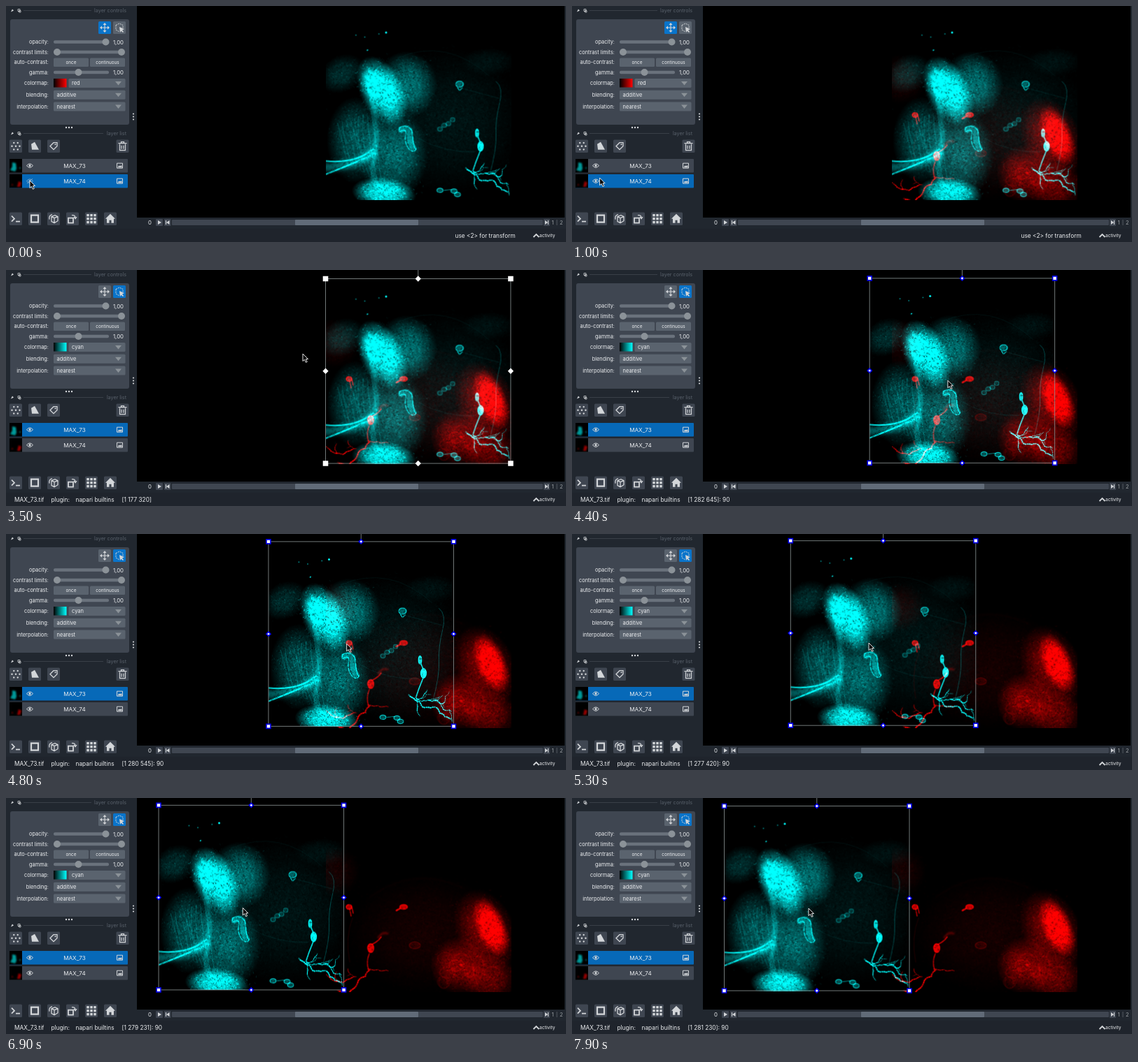
Animation, 800 px wide and 338 px high, one loop 8 s. Source, as an HTML page with a canvas:

```html
<!DOCTYPE html>
<html lang="en">
<head>
<meta charset="utf-8">
<title>Layer transform</title>
<style>
  html, body { margin: 0; width: 100%; height: 100%; overflow: hidden; background: #000; }
  canvas { position: absolute; left: 187px; top: 0; }
  svg { position: absolute; left: 0; top: 0; font-family: Inter, "Open Sans", sans-serif; }
  text { fill: #eceef0; white-space: pre; }
</style>
</head>
<body>
<canvas id="view" width="611" height="303"></canvas>
<svg id="ui" width="800" height="338" viewBox="0 0 800 338"></svg>
<script>
const LOOP = 8000, STEP = 100, LAG = 70;
const BG = '#21272f', PANEL = '#3f4651', FIELD = '#5a636e', GRAY = '#8b9298', BLUE = '#0769b8', ICON = '#d3d6d9';
const TILE = { x: 456.5, y: 12.5, size: 265 };
const $ = id => document.getElementById(id);
const view = $('view').getContext('2d');

// ---------- Microscopy tiles ----------
let seed = 7;
const random = () => (seed = (seed * 16807) % 2147483647) / 2147483647;
const spread = () => (random() + random() + random()) / 1.5 - 1;

function makeTile(rgb, paint) {
  const canvas = document.createElement('canvas');
  canvas.width = canvas.height = TILE.size;
  const c = canvas.getContext('2d');
  const tone = alpha => `rgba(${rgb},${alpha})`;
  const fleck = (x, y, length, color) => {
    const a = random() * 6.283;
    c.strokeStyle = color;
    c.beginPath();
    c.moveTo(x, y);
    c.lineTo(x + Math.cos(a) * length, y + Math.sin(a) * length);
    c.stroke();
  };
  c.fillStyle = '#000';
  c.fillRect(0, 0, TILE.size, TILE.size);
  c.translate(-TILE.x, -TILE.y);
  c.lineCap = c.lineJoin = 'round';
  c.globalCompositeOperation = 'lighter';
  paint({
    // Soft ellipse covered with fibres that thin out toward its edge.
    cloud(x, y, rx, ry, turn, glow) {
      c.save();
      c.translate(x, y);
      c.rotate(turn);
      c.save();
      c.scale(rx, ry);
      const g = c.createRadialGradient(0, 0, 0, 0, 0, 1);
      g.addColorStop(0, tone(glow));
      g.addColorStop(.5, tone(glow * .75));
      g.addColorStop(1, tone(0));
      c.fillStyle = g;
      c.fillRect(-1, -1, 2, 2);
      c.restore();
      c.lineWidth = .8;
      for (let i = rx * ry * .4; i > 0; i--)
        fleck(spread() * rx * 1.1, spread() * ry * 1.1, 1.8, tone(random() * glow * .5));
      c.restore();
    },
    line(d, alpha, width, blur = 0) {
      c.filter = blur ? `blur(${blur}px)` : 'none';
      c.strokeStyle = tone(alpha);
      c.lineWidth = width;
      c.stroke(new Path2D(d));
      c.filter = 'none';
    },
    cell(x, y, rx, ry, alpha, body = .4) {
      c.beginPath();
      c.ellipse(x, y, rx, ry, 0, 0, 7);
      c.fillStyle = tone(alpha * body);
      c.fill();
      c.strokeStyle = tone(alpha * .7);
      c.lineWidth = 1.2;
      c.stroke();
    },
    // A wandering process that throws off thinner side branches.
    dendrite(x, y, heading, length, width, depth = 2) {
      let a = heading;
      c.lineWidth = width;
      for (let run = 0; run < length; run += 3) {
        a += (heading - a) * .4 + (random() - .5) * 1.3;
        c.strokeStyle = tone(.45 + random() * .45);
        c.lineWidth = width;
        c.beginPath();
        c.moveTo(x, y);
        c.lineTo(x += Math.cos(a) * 3, y += Math.sin(a) * 3);
        c.stroke();
        if (depth && random() < .16)
          this.dendrite(x, y, heading + (random() - .5) * 2.4, length * .3, width * .6, depth - 1);
      }
    }
  });
  c.globalCompositeOperation = 'source-over';
  c.lineWidth = 1;
  for (let i = 0; i < 7000; i++)
    fleck(TILE.x + random() * TILE.size, TILE.y + random() * TILE.size, 1.5, `rgba(0,0,0,${random() * .6})`);
  return canvas;
}

const cyanTile = makeTile('0,245,245', p => {
  p.cloud(635, 165, 105, 105, 0, .07);
  p.cloud(480, 97, 34, 26, -.5, .16);
  p.cloud(690, 80, 40, 20, 0, .06);
  p.line('M560 74Q630 45 690 100', .06, 1, .5);

  p.cloud(500, 192, 42, 62, 0, .3);
  p.cloud(553, 212, 50, 66, 0, .38);
  p.cloud(572, 113, 44, 48, 0, .4);
  p.cloud(537, 122, 31, 54, -.45, .95);
  p.cloud(524, 112, 18, 26, -.3, .5);
  p.cloud(540, 268, 46, 23, .1, .95);
  p.line('M522 132Q533 175 526 215T536 260', .35, 5, 2.5);
  for (let i = 0; i < 9; i++) {
    const x = 474 + i * 6;
    p.line(`M${x} ${168 - i * 2}Q${x - 8 + random() * 20} 195 ${x + 14} ${226 + i * 3}`, .2, .8, .4);
  }
  p.line('M457 222Q500 226 524 205M457 241Q485 230 520 215', .75, 2, .7);
  p.line('M457 231Q500 229 522 211', .4, 11, 3);

  p.line('M565 177Q577 171 577 184T582 204', .3, 9, .6);
  p.line('M562 174Q580 168 581 186T586 205Q581 212 575 204T571 185T562 180Z', .65, 1.2);

  p.cell(648, 112, 5.5, 4.5, .9);
  p.line('M645 117L648 121L652 117', .7, 1.3);
  for (let i = 0; i < 4; i++) p.cell(638 - i * 6, 162 + i * 4 + random() * 3, 3.5, 3, .4);
  for (const [x, y] of [[620, 264], [640, 265], [645, 270]]) p.cell(x, y, 4.5, 3.2, .85);
  p.line('M626 264L636 263', .6, 1.2);
  p.cell(673, 182, 2.3, 6, .9, .9);
  p.cell(678, 201, 4, 7, 1, 1);
  p.line('M674 187L678 196M677 209Q671 223 667 236', .9, 1.7);
  p.dendrite(657, 232, .42, 75, 1.8);
  p.dendrite(668, 237, .25, 58, 1.4);
  p.dendrite(668, 237, 1.7, 25, .9);
  p.line('M700 108Q711 116 705 140T700 184T692 238', .3, .9);
  p.line('M652 118Q680 126 704 132M590 190Q625 210 670 209', .12, .7);
  p.cell(543, 38, 1, 1, .9, 1);
  for (let i = 0; i < 5; i++) p.cell(495 + random() * 45, 40 + random() * 30, .4, .4, .6, 1);
});

const redTile = makeTile('255,0,0', p => {
  p.cloud(600, 195, 115, 85, 0, .07);
  p.cloud(470, 105, 36, 36, 0, .08);
  p.line('M520 142Q585 95 655 130', .05, 1.2, .8);
  p.cloud(685, 190, 42, 62, -.4, .38);
  p.cloud(693, 185, 22, 46, -.4, .85);
  p.cloud(648, 240, 42, 42, 0, .38);
  p.cloud(690, 258, 40, 36, 0, .36);
  for (let i = 0; i < 12; i++) p.cell(625 + random() * 75, 218 + random() * 55, 6 + random() * 5, 8, .16, .1);

  p.cell(490, 156, 4, 3.5, 1, .7);
  p.line('M491 159L493 169M494 156L496 165', .75, 1.5);
  p.cell(568, 156, 5.5, 3.5, 1, .7);
  p.line('M563 158L558 161', .9, 2.5);
  p.cell(584, 211, 8, 5, .3);
  p.cell(521, 215, 4.5, 6.5, .95, .9);
  p.line('M524 209Q532 205 536 199M519 223Q514 235 518 246', .75, 1.5);
  p.line('M532 200Q538 191 545 194', .3, 3, .8);
  p.dendrite(520, 246, 2.85, 62, 1.8);
  p.dendrite(500, 256, 3.3, 43, 1.4);
  p.dendrite(517, 245, .4, 30, 1);
  p.line('M495 172Q484 200 491 235', .15, .8);
});

// ---------- Interface ----------
const rect = (x, y, w, h, fill, r = 0, extra = '') =>
  `<rect x="${x}" y="${y}" width="${w}" height="${h}" fill="${fill}" rx="${r}" ${extra}/>`;
const label = (x, y, s, size, anchor = 'start', extra = '') =>
  `<text x="${x}" y="${y}" font-size="${size}" text-anchor="${anchor}" ${extra}>${s}</text>`;
const shape = (d, fill = ICON) => `<path d="${d}" fill="${fill}"/>`;
const stroke = (d, color = ICON, w = 1.2, extra = '') =>
  `<path d="${d}" fill="none" stroke="${color}" stroke-width="${w}" ${extra}/>`;
const dot = (x, y, r, fill = ICON) => `<circle cx="${x}" cy="${y}" r="${r}" fill="${fill}"/>`;
const at = (x, y, content, id = '') => `<g ${id && `id="${id}"`} transform="translate(${x} ${y})">${content}</g>`;
const each = (n, draw) => Array.from({ length: n }, (_, i) => draw(i)).join('');
const turned = (n, content) => each(n, i => `<g transform="rotate(${360 / n * i})">${content}</g>`);

const slider = (y, end, ...knobs) =>
  rect(68, y - 2.2, end - 68, 4.4, '#6a727c', 2) + knobs.map(x => dot(x, y, 5, GRAY)).join('');
const combo = (x, y, s, id = '') => rect(x, y - 6.3, 170.5 - x, 13, FIELD, 1.5) +
  label(x + 4.5, y + 2.9, s, 7.5, 'start', id && `id="${id}"`) + shape(`M156 ${y - 2.3}h9l-4.5 5.5z`, GRAY);
const button = (x, y, s) => rect(x, y - 6, 50, 12.5, FIELD, 1.5) + label(x + 25, y + 2.5, s, 6.4, 'middle');
const square = (x, y, icon) => rect(x, y, 18, 18.5, PANEL, 1.5) + at(x + 9, y + 9.2, icon);
const header = (y, s, lineEnd) => shape(`M7 ${y + 1}l2-4l2 2z`) + stroke(`M17 ${y - 3}h3v3h-3zm1.500 2h2.500v2.500h-2.500z`, ICON, .8) +
  stroke(`M25 ${y - 1}H${lineEnd}`, '#393f48', 1) + label(172, y + 1.5, s, 7.2, 'end', 'style="fill:#59616b"');

const icons = {
  move: stroke('M-5 0H5M0-5V5', ICON, 1.1) + turned(4, shape('M7 0l-3-2.500v5z')),
  transform: stroke('M-5-3.500L0-6L5-3.500V1M-5-3.500L-5 3L0 6', ICON, 1, 'stroke-dasharray="2 1.2"') + shape('M0-1L7 2L4 3.500L6 6L5 7L2.500 4.700L1 7z'),
  picture: stroke('M-4-3.500h8v7h-8z', ICON, 1) + shape('M-3 2.500l2-3l1.500 1.500l1.500-2l1.500 3.500z'),
  eye: stroke('M-4.500 0Q0-5.500 4.500 0Q0 5.500-4.500 0Z', ICON, 1) + dot(0, 0, 1.6),
  points: dot(0, 0, 1.2) + turned(6, dot(5.5, 0, 1.2)),
  polygon: shape('M-5-3L0-6L6 5L-4 5z'),
  tag: stroke('M-5 0L0-5H5V0L0 5z', ICON, 1.3) + dot(2.5, -2.5, 1),
  trash: stroke('M-4-3V6H4V-3M-6-4H6M-2-4V-6H2V-4M-1.500-1V4M1.500-1V4'),
  console: stroke('M-6-4L-2 0L-6 4M0 4H6', ICON, 1.7),
  frame: stroke('M-5-5H5V5H-5z', ICON, 2.2),
  cube: stroke('M-3-3L2-5L6-3V3L1 6L-3 4zL1-1L6-3M1-1V6M-6 1Q-7-5-2-6', ICON, 1.3),
  roll: stroke('M-6-1H1V6H-6z', ICON, 1.8) + stroke('M-1-5Q4-6 4-1M2-2.500L4 0L6-2.500', ICON, 1.3),
  grid: each(9, i => rect(i % 3 * 5 - 6.7, Math.floor(i / 3) * 5 - 6.7, 3.4, 3.4, ICON)),
  home: shape('M0-7L7 0H5V6H1.500V2H-1.500V6H-5V0H-7z')
};
const toolbar = (y, ...names) => names.map((name, i) => square(5 + 27 * i, y, icons[name])).join('');
const eyeClosed = `<g opacity=".55">${icons.eye}${stroke('M-4 3.500L4-3.500', ICON, 1)}</g>`;
const row = (y, name, id, thumb) => rect(5, y, 169, 19.5, PANEL, 1, `id="${id}"`) + rect(5, y, 18, 19.5, '#000') +
  `<g filter="url(#blur)">${at(5, y, thumb)}</g>` + label(98, y + 12.8, name, 8.1, 'middle') +
  at(162.5, y + 9.7, icons.picture) + at(34, y + 9.7, icons.eye, id + 'Eye');

const names = ['opacity', 'contrast limits', 'auto-contrast', 'gamma', 'colormap', 'blending', 'interpolation'];
const rowY = i => i < 4 ? 51.5 + 14.5 * i : 110.3 + 16.8 * (i - 4);

const BOX = 264.5;
const handles = each(9, i => {
  const col = i % 3, line = Math.floor(i / 3), corner = col !== 1 && line !== 1;
  if (i === 4) return '';
  return at(col * BOX / 2, line * BOX / 2, corner ? '<path d="M-3-3h6v6h-6z"/>' : '<path d="M-3 0l3-3l3 3l-3 3z"/>');
});

$('ui').innerHTML = `
<defs>
  <clipPath id="viewClip"><rect x="187" width="611" height="303"/></clipPath>
  <linearGradient id="ramp"><stop/><stop offset="1" id="rampEnd"/></linearGradient>
  <filter id="blur"><feGaussianBlur stdDeviation=".8"/></filter>
</defs>
${rect(0, 0, 187, 338, BG)}${rect(187, 303, 613, 35, BG)}${rect(798, 0, 2, 303, BG)}${rect(0, 319, 800, 19, '#1f242c')}
${header(7.5, 'layer controls', 122)}${rect(6, 19, 170, 151, PANEL, 3)}
${rect(132, 22, 18, 18, FIELD, 1.5, 'id="panButton"')}${at(141, 31, icons.move)}
${rect(153, 22, 18, 18, FIELD, 1.5, 'id="transformButton"')}${at(162, 31, icons.transform)}
${names.map((s, i) => label(61, rowY(i) + 2.6, s + ':', 7.4, 'end')).join('')}
${slider(rowY(0), 147, 142.5)}${label(168, rowY(0) + 3, '1,00', 7.8, 'end')}
${slider(rowY(1), 168, 73, 165)}
${button(68, rowY(2), 'once')}${button(120, rowY(2), 'continuous')}
${slider(rowY(3), 147, 103.5)}${label(168, rowY(3) + 3, '1,00', 7.8, 'end')}
${rect(68, 104, 18.5, 12.5, 'url(#ramp)')}${combo(89.5, rowY(4), 'red', 'colormap')}
${combo(68, rowY(5), 'additive')}${combo(68, rowY(6), 'nearest')}
${each(3, i => dot(86 + 4 * i, 174, 1.2) + dot(182, 154.5 + 4 * i, 1.1))}
${header(183.5, 'layer list', 139)}
${toolbar(191.5, 'points', 'polygon', 'tag')}${square(157.5, 191.5, icons.trash)}
${row(219, 'MAX_73', 'cyanRow', shape('M4 5L9 6L10 14L8 18L1 16L4 11Z', '#099') + dot(15, 13, 1, '#088'))}
${row(241, 'MAX_74', 'redRow', shape('M13 10l4 2l-2 6h-4z', '#900') + dot(4, 15, 1, '#800'))}
${toolbar(295.5, 'console', 'frame', 'cube', 'roll', 'grid', 'home')}
${label(203, 313, '0', 7.8)}
${rect(214, 305, 10, 10, PANEL, 1)}${shape('M217 307l5 3l-5 3z')}
${rect(226, 305, 9.5, 10, PANEL, 1)}${shape('M233.500 307l-4.500 3l4.500 3zM228 307h1v6h-1z')}
${rect(237, 306, 530, 8, PANEL, 1)}${rect(413, 306, 176, 8, '#616b78', 1)}
${rect(768, 305, 9, 10, PANEL, 1)}${shape('M770 307l4 3l-4 3zM774 307h1v6h-1z')}
<g opacity=".6">${label(779.5, 313, '1', 7.5)}${stroke('M787 306V314', GRAY, .8)}${label(791, 313, '2', 7.5)}</g>
${stroke('M753.500 331L757.500 327L761.500 331', ICON, 1.8)}${label(762, 331, 'activity', 6.6)}
<g id="status">${label(12, 331.5, 'MAX_73.tif', 8.3)}${label(64.5, 331.5, 'plugin:', 8.3)}${label(99.5, 331.5, 'napari builtins', 8.3)}${label(165.5, 331.5, '', 8.3, 'start', 'id="coords"')}</g>
${label(641.5, 331.5, 'use &lt;2&gt; for transform', 8.3, 'start', 'id="help"')}
<g clip-path="url(#viewClip)"><g id="box">
  ${stroke(`M0 0H${BOX}V${BOX}H0ZM${BOX / 2} 0V-30`, '#8f9797', .8)}<g id="handles" fill="#fff" stroke-width="1.6">${handles}</g>
</g></g>
<path id="cursor" d="M0 0V10.500L2.500 8.300L4.300 12.300L6.200 11.500L4.400 7.600H7.500Z" fill="#000" stroke="#fff" stroke-width=".9"/>`;

// ---------- Motion ----------
const REST = { x: 34, y: 250 }, GRAB = { x: 577, y: 159 };
const moves = [
  { from: 900, to: 1400, x: 62, y: 231 },
  { from: 1900, to: 2600, x: 162, y: 30 },
  { from: 3050, to: 3500, x: 424, y: 120 },
  { from: 3500, to: 3800, ...GRAB },
  { from: 4080, to: 5300, x: 424, y: 156 },
  { from: 5300, to: 6030, x: 341, y: 152 },
  { from: 6100, to: 7000, x: 338, y: 158 }
];
const cursorAt = t => moves.reduce((p, m) => {
  const f = Math.min(1, Math.max(0, (t - m.from) / (m.to - m.from)));
  return { x: p.x + (m.x - p.x) * f, y: p.y + (m.y - p.y) * f };
}, REST);

const show = (id, on) => $(id).setAttribute('visibility', on ? 'visible' : 'hidden');
const fill = (id, color) => $(id).setAttribute('fill', color);
const place = (id, x, y) => $(id).setAttribute('transform', `translate(${x} ${y})`);

function render(t) {
  const redOn = t >= 500, cyanActive = t >= 1500, transforming = t >= 2800, hovering = t >= 3700;
  const cursor = cursorAt(t), trail = cursorAt(t - LAG);
  const dragging = t >= moves[4].from;
  const dx = dragging ? trail.x - GRAB.x : 0, dy = dragging ? trail.y - GRAB.y : 0;

  view.globalCompositeOperation = 'source-over';
  view.fillStyle = '#000';
  view.fillRect(0, 0, 611, 303);
  view.globalCompositeOperation = 'lighter';
  if (redOn) view.drawImage(redTile, TILE.x - 187, TILE.y);
  view.drawImage(cyanTile, TILE.x - 187 + dx, TILE.y + dy);

  $('redRowEye').innerHTML = redOn ? icons.eye : eyeClosed;
  fill('redRow', cyanActive ? PANEL : BLUE);
  fill('cyanRow', cyanActive ? BLUE : PANEL);
  $('colormap').textContent = cyanActive ? 'cyan' : 'red';
  $('rampEnd').setAttribute('stop-color', cyanActive ? '#0ff' : '#f00');
  fill('panButton', transforming ? FIELD : '#0a74ca');
  fill('transformButton', transforming ? '#0a74ca' : FIELD);

  show('box', transforming);
  place('box', TILE.x + dx, TILE.y + dy);
  $('handles').setAttribute('stroke', hovering ? '#0000e8' : '#fff');

  show('help', !transforming);
  show('status', t >= 3200);
  $('coords').textContent = `[1 ${Math.round(2 * trail.y - 35)} ${Math.round(2 * trail.x - 446)}]${hovering ? ': 90' : ''}`;
  place('cursor', cursor.x, cursor.y);
}

const start = performance.now();
function tick() {
  const t = (performance.now() - start) % LOOP;
  render(Math.floor(t / STEP) * STEP);
  requestAnimationFrame(tick);
}
tick();
</script>
</body>
</html>
```
